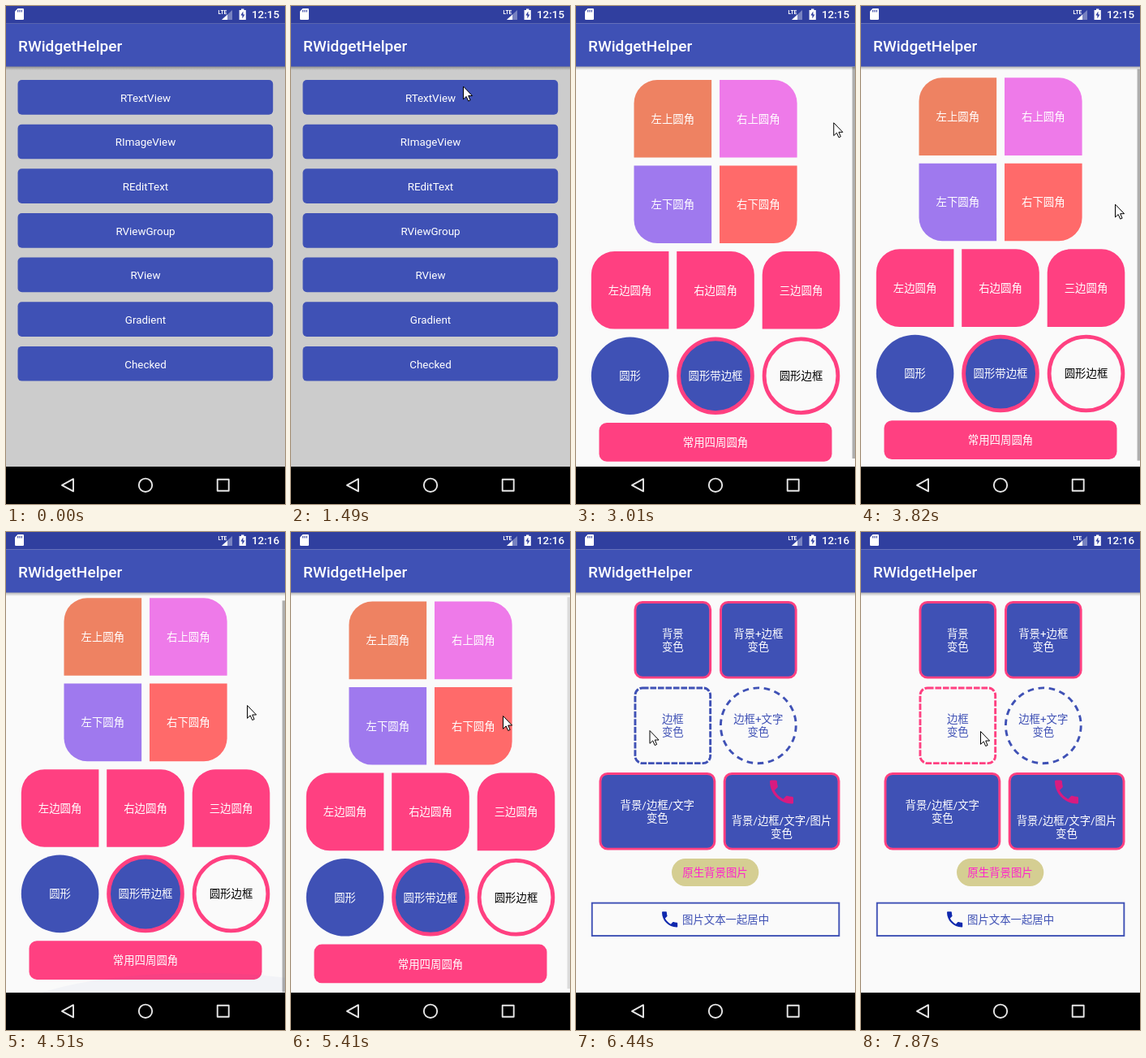
These frames come from a looping animation (344x613 px, 8000 ms). An HTML page:

```html
<!DOCTYPE html>
<html lang="zh-CN">
<head>
<meta charset="utf-8">
<title>RWidgetHelper</title>
<style>
html, body { margin: 0; width: 100%; height: 100%; overflow: hidden; background: #000; }
svg { display: block; width: 344px; height: 613px; }
text { font-family: Roboto, 'Noto Sans CJK SC', 'Noto Sans CJK', sans-serif; font-size: 13.4px; }
.mid { text-anchor: middle; }
.title { font-size: 19.1px; font-weight: 500; }
</style>
</head>
<body>
<svg id="stage" viewBox="0 0 344 613"></svg>
<script>
const LOOP = 8000, W = 344, CELL = 95.6;
const BLUE = '#3f51b5', DARK = '#303f9f', PINK = '#ff4081', WHITE = '#fff';
const PHONE = 'M6.62 10.79c1.44 2.83 3.76 5.14 6.59 6.59l2.2-2.2c.27-.27.67-.36 1.02-.24 1.12.37 2.33.57 3.57.57.55 0 1 .45 1 1V20c0 .55-.45 1-1 1-9.39 0-17-7.61-17-17 0-.55.45-1 1-1h3.5c.55 0 1 .45 1 1 0 1.25.2 2.45.57 3.57.11.35.03.74-.25 1.02z';

const attrs = o => Object.entries(o).map(([k, v]) => `${k}="${v}"`).join(' ');
const tag = (name, o, body = '') => `<${name} ${attrs(o)}>${body}</${name}>`;
const rect = (x, y, width, height, fill, more = {}) => tag('rect', { x, y, width, height, fill, ...more });
const path = (d, fill, more = {}) => tag('path', { d, fill, ...more });
const text = (s, x, y, fill = WHITE, more = {}) => tag('text', { x, y, fill, ...more }, s);

// Lines of text centred on (cx, cy)
const label = (s, cx, cy, fill = WHITE) => s.split('\n').map((line, i, all) =>
  text(line, cx, cy + 5 + (i - (all.length - 1) / 2) * 15.8, fill, { class: 'mid' })).join('');

// Square cell with chosen round corners: tl, tr, br, bl
function corners(x, y, flags, fill, s) {
  const [a, b, c, d] = [...flags].map(f => f * 28.7), e = CELL;
  const arc = (r, dx, dy) => r ? `a${r} ${r} 0 0 1 ${dx * r} ${dy * r}` : '';
  return path(`M${x + a} ${y}H${x + e - b}${arc(b, 1, 1)}V${y + e - c}${arc(c, -1, 1)}` +
    `H${x + d}${arc(d, -1, -1)}V${y + a}${arc(a, 1, -1)}Z`, fill) + label(s, x + e / 2, y + e / 2);
}

// Box whose border lies inside its bounds
const framed = (x, y, w, h, r, fill, stroke, sw, more = {}) =>
  rect(x + sw / 2, y + sw / 2, w - sw, h - sw, fill, { rx: r, stroke, 'stroke-width': sw, ...more });

const disc = (cx, cy, fill, s, ink, sw = 0) =>
  tag('circle', { cx, cy, r: CELL / 2 - sw / 2, fill, stroke: PINK, 'stroke-width': sw }) + label(s, cx, cy, ink);

const phone = (x, y, size, fill) => {
  const k = size / 18;
  return path(PHONE, fill, { transform: `translate(${x - 3 * k} ${y - 3 * k}) scale(${k})` });
};

const screen = (bg, body) => rect(0, 0, W, 613, bg) + body +
  rect(0, 74, W, 5, 'url(#shade)') + rect(0, 21.5, W, 53, BLUE) + rect(0, 0, W, 21.5, DARK) +
  text('RWidgetHelper', 15, 55.7, WHITE, { class: 'title' });

const menu = ['RTextView', 'RImageView', 'REditText', 'RViewGroup', 'RView', 'Gradient', 'Checked']
  .map((s, i) => {
    const y = 91 + i * 54.65;
    return rect(14.5, y, 314.7, 42.7, BLUE, { rx: 5 }) + text(s, 172, y + 26.7, WHITE, { class: 'mid' });
  }).join('');

const shapes =
  corners(71.5, 91, '1000', '#ee8262', '左上圆角') +
  corners(177, 91, '0100', '#ee7ae9', '右上圆角') +
  corners(71.5, 196.4, '0001', '#9f79ee', '左下圆角') +
  corners(177, 196.4, '0010', '#ff6a6a', '右下圆角') +
  corners(18.8, 302, '1001', PINK, '左边圆角') +
  corners(124.2, 302, '0110', PINK, '右边圆角') +
  corners(229.7, 302, '1110', PINK, '三边圆角') +
  disc(66.6, 455.2, BLUE, '圆形', WHITE) +
  disc(172, 455.2, BLUE, '圆形带边框', WHITE, 4.8) +
  disc(277.5, 455.2, 'none', '圆形边框', '#000', 4.8) +
  rect(28.5, 513, 287, 47.7, PINK, { rx: 9.5 }) + label('常用四周圆角', 172, 537);

const states =
  framed(71.5, 85, CELL, CELL, 9, BLUE, PINK, 2.9) + label('背景\n变色', 119.3, 133) +
  framed(177, 85, CELL, CELL, 9, BLUE, PINK, 2.9) + label('背景+边框\n变色', 224.8, 133) +
  framed(71.5, 190.5, CELL, CELL, 9, 'none', BLUE, 2.9, { id: 'press', 'stroke-dasharray': '7.6 1.9' }) +
  label('边框\n变色', 119.3, 238.3, BLUE) +
  tag('circle', { cx: 224.8, cy: 238.3, r: 46.4, fill: 'none', stroke: BLUE, 'stroke-width': 2.9, 'stroke-dasharray': '7.6 5.65' }) +
  label('边框+文字\n变色', 224.8, 238.3, BLUE) +
  framed(28.5, 296, 143.8, CELL, 9, BLUE, PINK, 2.9) + label('背景/边框/文字\n变色', 100.3, 344) +
  framed(181.7, 296, 143.8, CELL, 9, BLUE, PINK, 2.9) + phone(239, 305.5, 29, '#d81b80') +
  label('背景/边框/文字/图片\n变色', 253.5, 363) +
  rect(118, 402, 107.3, 34, '#d5ce92', { rx: 17 }) + label('原生背景图片', 171.5, 419, '#ff22cc') +
  framed(18.8, 455.7, 306.5, 42.3, 0, 'none', BLUE, 1.9) + phone(106, 467.3, 19.2, '#1029ae') +
  text('图片文本一起居中', 131, 482, BLUE);

const status =
  path('M14.5 3H20.8Q22 3 22 4.2V15.8Q22 17 20.8 17H12.2Q11 17 11 15.8V6.5Z', WHITE) +
  path('M14.7 5v2.6M17 5v2.6M19.3 5v2.6', 'none', { stroke: DARK, 'stroke-width': 1.1 }) +
  path('M279 5V17H266Z', WHITE, { opacity: .35 }) + path('M273 10.6V17H266Z', WHITE) +
  text('LTE', 261.5, 9.6, WHITE, { style: 'font-size:6.6px;font-weight:700' }) +
  path('M290 3.6h3.4v1.4h2.4v12h-8.2V5h2.4z', WHITE) + path('M292.4 6.6l-3 5h2v3.8l3-5h-2z', DARK) +
  text('12:15', 337, 15, WHITE, { id: 'clock', style: 'font-weight:500;text-anchor:end' });

const line = { stroke: '#e6e6e6', 'stroke-width': 1.9, 'stroke-linejoin': 'round' };
const nav = rect(0, 567, W, 46, '#000') +
  path('M83 582.2V597.4L69 589.8Z', 'none', line) +
  tag('circle', { cx: 172, cy: 589.8, r: 8.2, fill: 'none', ...line }) +
  rect(260.7, 582.8, 14, 14, 'none', line);

const cursor = path('M.5 .5V16.3L4.2 12.9L6.7 18.5L9.1 17.5L6.7 12H11.6Z', WHITE,
  { id: 'cursor', stroke: '#000', 'stroke-width': 1 });

const stage = document.getElementById('stage');
stage.innerHTML =
  `<defs><linearGradient id="shade" x2="0" y2="1"><stop stop-opacity=".32"/><stop offset="1" stop-opacity="0"/></linearGradient></defs>` +
  screen('#ccc', menu) +
  tag('g', { id: 'detail' }, screen('#fafafa',
    tag('g', { id: 'first' }, shapes) + tag('g', { id: 'second' }, states) +
    tag('ellipse', { id: 'glow', cx: 240, cy: 600, rx: 240, ry: 57, fill: BLUE }) +
    rect(340.6, 75, 3.4, 482, '#000', { id: 'bar' }))) +
  status + nav + cursor;
const el = {};
stage.querySelectorAll('[id]').forEach(n => el[n.id] = n);
const set = (id, o) => Object.entries(o).forEach(([k, v]) => el[id].setAttribute(k, v));

const RUNS = [[680, 1490, 7], [1790, 2310, 4], [2590, 3550, 8], [3700, 4090, 4], [4390, 4510, 2],
  [4660, 5410, 6], [5570, 5720, 2], [5870, 6590, 6], [6720, 7870, 2]];
const TICKS = RUNS.flatMap(([a, b, n]) => Array.from({ length: n }, (_, i) => Math.round(a + (b - a) * i / (n - 1))));
const snap = t => TICKS.reduce((last, k) => k <= t ? k : last, 0);

// Linear interpolation through [time, ...values]
function track(keys, t) {
  const i = keys.findIndex(k => k[0] > t);
  if (i < 0) return keys[keys.length - 1].slice(1);
  if (!i) return keys[0].slice(1);
  const [a, b] = [keys[i - 1], keys[i]], p = (t - a[0]) / (b[0] - a[0]);
  return a.slice(1).map((v, j) => v + (b[j + 1] - v) * p);
}

const POINTER = [[0, 400, 589], [679, 400, 589], [680, 332, 589], [950, 285, 330], [1220, 234, 150],
  [1490, 212, 98.5], [2450, 212, 98.5], [3010, 319, 144], [3140, 333, 178], [3550, 318, 252],
  [4090, 300, 222], [4510, 297, 213], [4960, 285, 222], [5410, 261, 226], [5570, 70, 232],
  [5720, -20, 236], [6014, -20, 240], [6300, 90, 244], [6590, 163, 245], [6720, 147, 245]];
const SCROLL = [[3550, 0], [4090, 9.8], [4510, 9.8], [4960, 5.4]];
const PAGE = [[5410, 0], [5570, 160], [5720, 319.3], [5870, 342], [6014, W]];
const BAR = [[4960, .3], [5410, .12], [5570, 0]];
const GLOW = [[3830, 0], [4090, .04], [4510, .04], [4810, 0]];

function draw(time) {
  const t = snap(time);
  const [x, y] = track(POINTER, t), [scroll] = track(SCROLL, t), [page] = track(PAGE, t);
  const open = Math.min(1, Math.max(0, (t - 1720) / 400));
  const drop = 47 * (1 - open) ** 3;
  set('detail', { transform: `translate(0 ${drop})`, opacity: Math.min(1, open * 1.7) });
  set('first', { transform: `translate(${-page} ${-scroll})` });
  set('second', { transform: `translate(${W - page} 0)` });
  set('bar', { y: 75 + scroll * .96, opacity: track(BAR, t)[0] });
  set('glow', { opacity: track(GLOW, t)[0] });
  set('press', { stroke: t >= 7870 ? PINK : BLUE });
  set('cursor', { transform: `translate(${x} ${y})` });
  el.clock.textContent = t < 4390 ? '12:15' : '12:16';
}

const start = performance.now();
function tick() {
  draw((performance.now() - start) % LOOP);
  requestAnimationFrame(tick);
}
tick();
</script>
</body>
</html>
```
